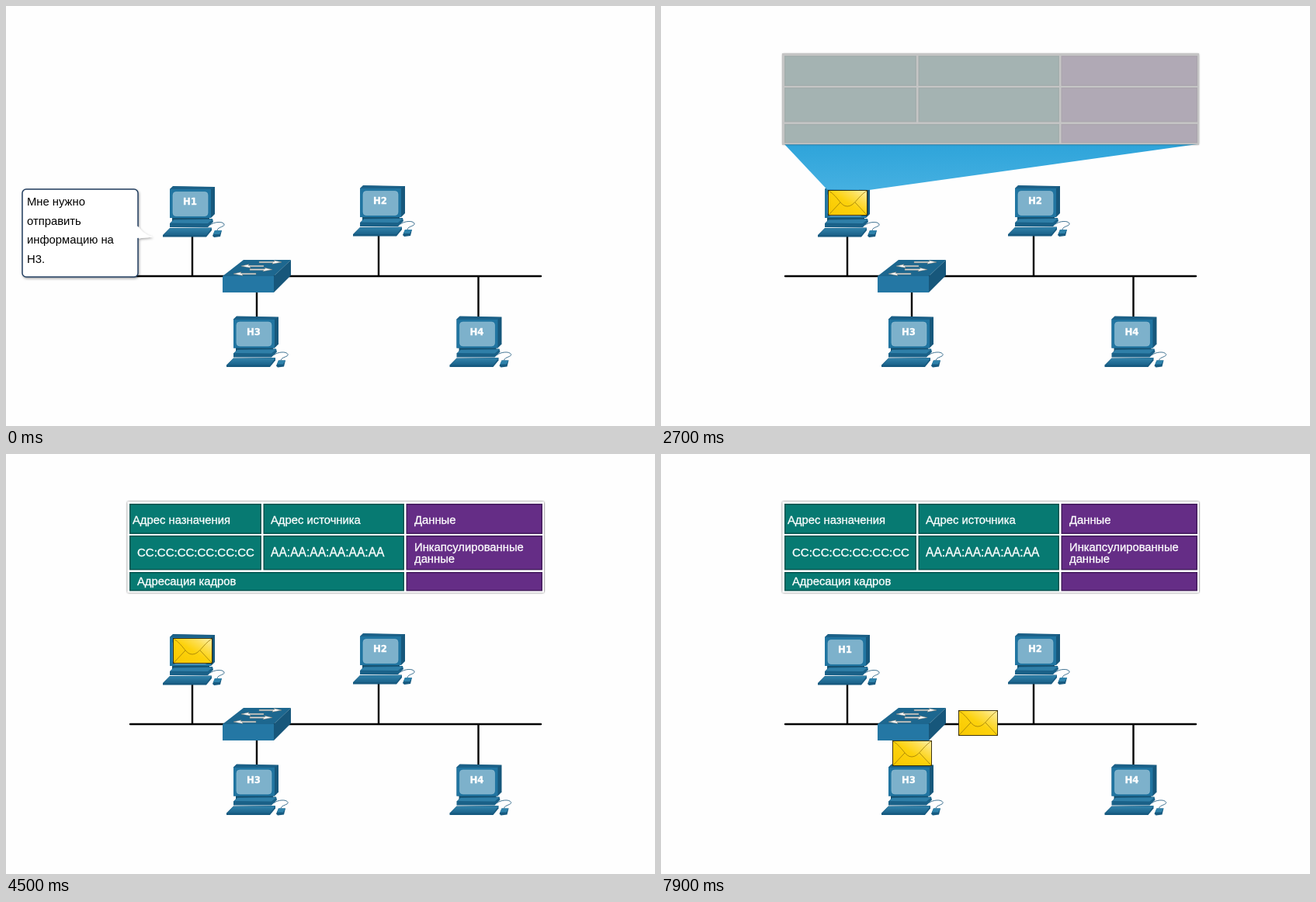
These frames come from a looping animation (836x541 px, 8000 ms). An HTML page:

```html
<!DOCTYPE html>
<html lang="ru">
<head>
<meta charset="utf-8">
<style>
  html, body { margin: 0; width: 100%; height: 100%; overflow: hidden; background: #fefefe; }
  svg { display: block; width: 836px; height: 541px; }
  text { font-family: "Liberation Sans", Arial, sans-serif; font-size: 14.8px; }
  .name { font: bold 11.8px "DejaVu Sans", sans-serif; fill: #fff; stroke: #fff; stroke-width: .3; text-anchor: middle; }
  #labels text { fill: #fff; stroke: #fff; stroke-width: .3; }
  #labels .address { font-size: 15px; }
  .wire { stroke: #000; stroke-width: 2.4; stroke-linecap: round; fill: none; }
</style>
</head>
<body>
<svg viewBox="0 0 836 541">
  <defs>
    <linearGradient id="gold" x1="0" y1="1" x2="1" y2="0">
      <stop offset="0" stop-color="#f8c800"/>
      <stop offset=".5" stop-color="#fdd20c"/>
      <stop offset=".75" stop-color="#fddf55"/>
      <stop offset="1" stop-color="#fff2b0"/>
    </linearGradient>
    <linearGradient id="sky" x1="0" y1="0" x2="0" y2="1">
      <stop offset="0" stop-color="#2ea4da"/>
      <stop offset="1" stop-color="#45b0e1"/>
    </linearGradient>
    <linearGradient id="keys" x1="0" y1="0" x2="0" y2="1">
      <stop offset="0" stop-color="#3283ab"/>
      <stop offset="1" stop-color="#1b638b"/>
    </linearGradient>
    <filter id="shade" x="-10%" y="-10%" width="125%" height="125%">
      <feDropShadow dx="1" dy="1.5" stdDeviation="1.5" flood-color="#000" flood-opacity=".35"/>
    </filter>
    <filter id="glow" x="-5%" y="-10%" width="110%" height="120%">
      <feDropShadow dx="0" dy="0" stdDeviation="1.2" flood-color="#000" flood-opacity=".8"/>
    </filter>
    <clipPath id="wipe"><rect id="wipeBox" width="836" height="237"/></clipPath>

    <g id="pc">
      <path d="M12 38H60V46H12Z" fill="#14506f"/>
      <path d="M9 4 13 0 67 1 67 36 62 41 9 41Z" fill="#17587c"/>
      <path d="M9 4H62V41H9Z" fill="#2175a1"/>
      <path d="M9 4 13 .5 66.500 1.500 62 4Z" fill="#1b6189"/>
      <rect x="13" y="7.500" width="45" height="31" rx="4" fill="#7db1cb" stroke="#94bfd4" stroke-width=".6"/>
      <path d="M9 48 14 43 64 42 65 46 58 53 9 53Z" fill="#1a6188"/>
      <path d="M10 47.500 14 43.500 64 43 58 48Z" fill="#2f7fa8"/>
      <path d="M0 63 9 54 63 53.500 63 57 56 65.500 0 65.500Z" fill="#175a80"/>
      <path d="M1 63 9 54.500 63 54 56 63Z" fill="url(#keys)"/>
      <path d="M61 50C66 46 77 45 79 49C80 53 71 52 70 57" fill="none" stroke="#2b6486" stroke-width=".9"/>
      <path d="M64 64 67 57 76 57 74 65 66 66Z" fill="#175a80"/>
      <path d="M65 62 67 57 76 57 73 62Z" fill="#2e82ab"/>
    </g>

    <g id="letter">
      <rect x=".5" y=".5" width="50" height="32" fill="url(#gold)" stroke="#2b2200" stroke-width=".9"/>
      <path d="M1 1C14 9 16 21 25 21S38 9 50 1M1 32 16 16M50 32 35 16" fill="none" stroke="#9c7a08" stroke-width=".8"/>
    </g>

    <path id="arrow" d="M-14-.7H6L5-2.200 15 0 3 2.200 4 .7H-14Z" fill="#fff" stroke="#8f8474" stroke-width=".5"/>
  </defs>

  <path class="wire" d="M160 348H689M240 296V348M480 296V348M323 366V402M608.500 348V402"/>
  <g id="hosts"></g>

  <g id="switch">
    <path d="M279 348 306 327H367L345 348Z" fill="#1d678f"/>
    <path d="M279 348H345V369H279Z" fill="#2477a4"/>
    <path d="M345 348 367 327V347L345 369Z" fill="#17577b"/>
    <use href="#arrow" x="340" y="330"/>
    <use href="#arrow" transform="translate(318 335) scale(-1 1)"/>
    <use href="#arrow" x="328" y="339.500"/>
    <use href="#arrow" transform="translate(308 345) scale(-1 1)"/>
  </g>

  <g id="bubble">
    <g filter="url(#shade)">
      <path d="M169 281Q174 293 189 297.500L169 299.500Z" fill="#fff"/>
      <rect x="21" y="236" width="149" height="113" rx="5" fill="#fff" stroke="#243f60" stroke-width="1.500"/>
    </g>
    <path d="M168 282.500 171 285Q176 294 188 297.500L168 299Z" fill="#fff"/>
    <text x="27" y="257">Мне нужно</text>
    <text x="27" y="282">отправить</text>
    <text x="27" y="306">информацию на</text>
    <text x="27" y="331">H3.</text>
  </g>

  <path id="beam" d="M159 178H691L268 237 214 236.500Z" fill="url(#sky)" clip-path="url(#wipe)"/>

  <g id="table">
    <rect x="156.500" y="61.500" width="536.500" height="117" rx="1" fill="#fff" filter="url(#glow)"/>
    <g id="cells"></g>
    <rect id="veil" x="156" y="61" width="537" height="118" fill="#666"/>
    <g id="labels">
      <text x="163" y="90">Адрес назначения</text>
      <text x="341" y="90">Адрес источника</text>
      <text x="526" y="90">Данные</text>
      <text class="address" x="169" y="132">CC:CC:CC:CC:CC:CC</text>
      <text class="address" x="341" y="132" style="font-size:15.600px">AA:AA:AA:AA:AA:AA</text>
      <text x="526" y="125">Инкапсулированные</text>
      <text x="526" y="140">данные</text>
      <text x="169" y="169">Адресация кадров</text>
    </g>
  </g>

  <use id="mail" href="#letter"/>
  <use id="copy" href="#letter"/>
</svg>
<script>
const $ = id => document.getElementById(id);
const LOOP = 8000;

$('hosts').innerHTML = [[202, 232], [447, 231], [284, 399.5], [571.5, 399.5]].map(([x, y], i) =>
  `<use href="#pc" x="${x}" y="${y}"/><text class="name" x="${x + 35}" y="${y + 24}">H${i + 1}</text>`).join('');

const TEAL = ['#077a72', '#04544f'], PURPLE = ['#652d86', '#431b5c'];
const cell = (x, y, right, bottom, [fill, edge]) =>
  `<rect x="${x + .75}" y="${y + .75}" width="${right - x - 1.5}" height="${bottom - y - 1.5}"
    fill="${fill}" stroke="${edge}" stroke-width="1.5"/>`;
$('cells').innerHTML = [[64, 103], [105, 149.5], [152, 176.5]].map(([y, b], row) =>
  (row < 2 ? cell(159, y, 329, b, TEAL) + cell(331.5, y, 513, b, TEAL) : cell(159, y, 513, b, TEAL)) +
  cell(515.5, y, 691, b, PURPLE)).join('');

const show = (id, on) => $(id).style.display = on ? '' : 'none';
const place = (id, [x, y]) => $(id).setAttribute('transform', `translate(${x} ${y})`);

// Linear travel through [time, x, y] stops.
function along(stops, t) {
  if (t <= stops[0][0]) return stops[0].slice(1);
  for (let i = 1; i < stops.length; i++) {
    const [t0, x0, y0] = stops[i - 1], [t1, x1, y1] = stops[i];
    if (t <= t1) {
      const k = (t - t0) / (t1 - t0);
      return [x0 + (x1 - x0) * k, y0 + (y1 - y0) * k];
    }
  }
  return stops[stops.length - 1].slice(1);
}

const SPLIT = 7430;
const toSwitch = [[5630, 215, 237], [6100, 215, 284], [6582, 215, 331], [6900, 246, 331], [SPLIT, 298, 331]];
const onward = [...toSwitch, [7900, 383, 330]];
const down = [...toSwitch, [7900, 298, 369]];

function draw(time) {
  // The picture advances in 200 ms steps.
  const t = Math.floor((time - 100) / 200) * 200 + 100;

  show('bubble', t < 500);

  show('beam', t >= 2300 && t < 4500);
  $('wipeBox').setAttribute('y', t < 2500 ? 222 : t < 2700 ? 184 : 178);

  const fade = Math.min(1, Math.max(0, (t - 2500) / 800));
  show('table', fade > 0);
  $('table').style.opacity = Math.min(1, fade * 2);
  $('veil').style.opacity = 0.98 * (1 - fade);
  $('labels').style.opacity = Math.max(0, fade * 2 - 1);

  show('mail', t >= 1300);
  show('copy', t > SPLIT);
  place('mail', along(onward, t));
  place('copy', along(down, t));
}

const start = performance.now();
function frame() {
  draw((performance.now() - start) % LOOP);
  requestAnimationFrame(frame);
}
frame();
</script>
</body>
</html>
```
